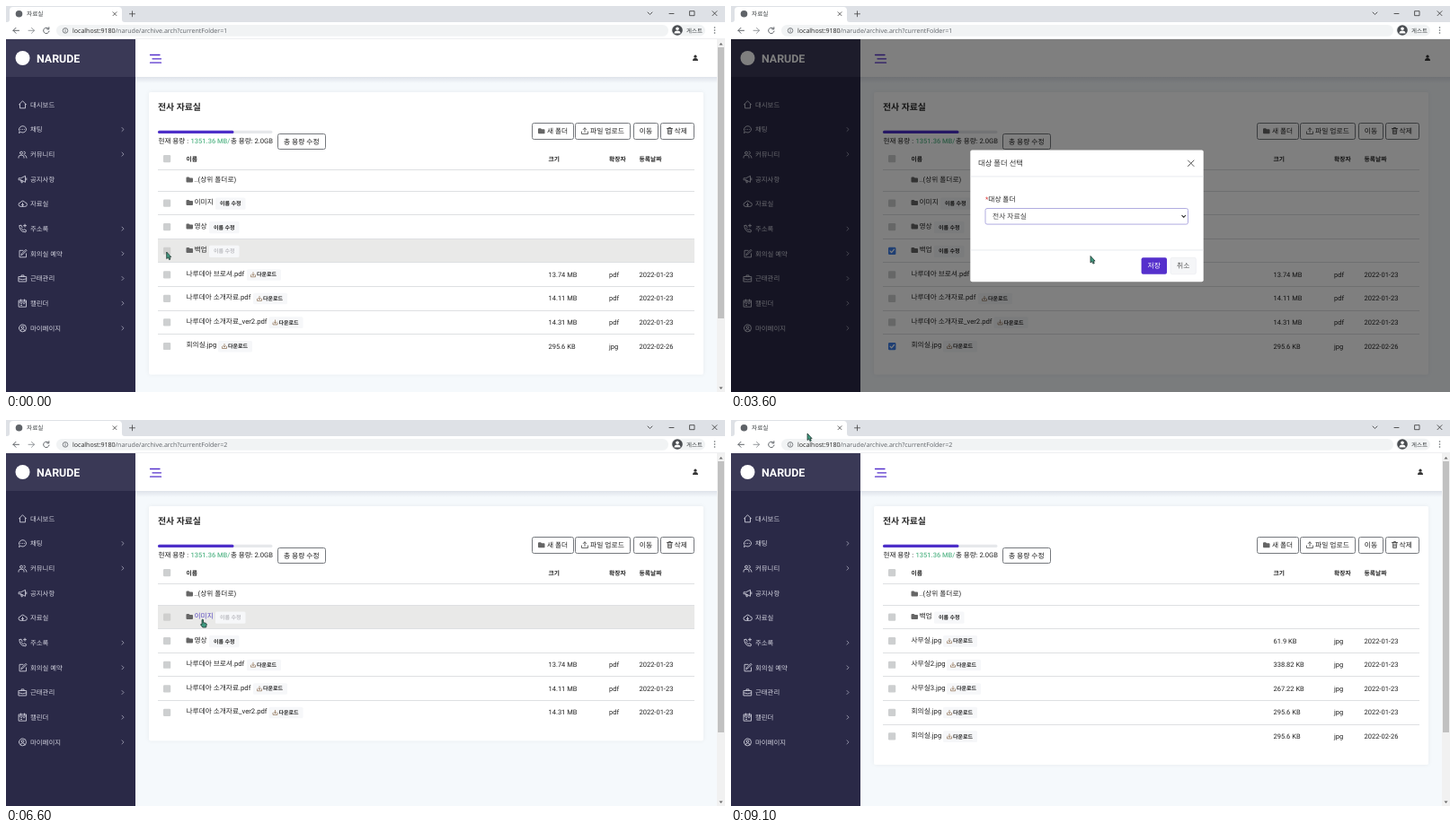
Animation of 800 by 430 pixels, one loop 9200 ms. Source, as an HTML page:

```html
<!DOCTYPE html>
<html lang="ko">
<head>
<meta charset="utf-8">
<title>자료실</title>
<style>
html, body { margin: 0; width: 100%; height: 100%; overflow: hidden; background: #f5f9fc; }
svg { display: block; width: 800px; height: 430px; }
text { font-family: Roboto, "Noto Sans CJK KR", "Noto Sans CJK", sans-serif; white-space: pre; text-rendering: geometricPrecision; }
.ui { font-family: "Open Sans", "Noto Sans CJK KR", "Noto Sans CJK", sans-serif; }
</style>
</head>
<body>
<svg id="stage" viewBox="0 0 800 430" xmlns="http://www.w3.org/2000/svg">
  <g id="page"></g>
  <g id="head"></g>
  <g id="table"></g>
  <g id="over"></g>
  <g id="browser"></g>
  <g id="cursor"></g>
</svg>
<script>
const LOOP = 9200, STEP = 100;
const INK = '#222', PURPLE = '#5530cc', SIDE = 144;
const $ = id => document.getElementById(id);

const rect = (x, y, w, h, fill, r = 0, extra = '') =>
  `<rect x="${x}" y="${y}" width="${w}" height="${h}" rx="${r}" fill="${fill}" ${extra}/>`;
const text = (x, y, s, size = 7.6, fill = INK, extra = '') =>
  `<text x="${x}" y="${y}" font-size="${size}" fill="${fill}" ${extra}>${s}</text>`;
const line = (d, color, w = 0.8) =>
  `<path d="${d}" fill="none" stroke="${color}" stroke-width="${w}" stroke-linecap="round" stroke-linejoin="round"/>`;
const shape = (d, fill, extra = '') => `<path d="${d}" fill="${fill}" ${extra}/>`;
const circle = (x, y, r, fill, extra = '') => `<circle cx="${x}" cy="${y}" r="${r}" fill="${fill}" ${extra}/>`;
const at = (x, y, s, extra = '') => `<g transform="translate(${x} ${y})" ${extra}>${s}</g>`;
const MID = 'text-anchor="middle"', BOLD = 'font-weight="700"';

const folder = (x, y) => shape(`M${x} ${y + 1}q0-1 1-1h2l1 1h2.6q.9 0 .9.9v3.2q0 .9-.9.9h-5.6q-1 0-1-1z`, '#666');
const download = (x, y, color) => line(`M${x} ${y + 3}v2h5v-2M${x + 2.5} ${y}v3.3m-1.3-1.2l1.3 1.3 1.3-1.3`, color, 0.7);
const person = (x, y) => circle(x, y - 1.8, 1.6, '#333') + shape(`M${x - 3} ${y + 3}q0-3 3-3t3 3z`, '#333');

// Sidebar icons on a 10 unit grid
const ICONS = [
  'M1 5L5 1l4 4M2 4.5V9h6V4.5',
  'M1 5a4 3.6 0 1 1 2 3L1 9l.6-2A3.5 3.5 0 0 1 1 5M3.2 5h.1M5 5h.1M6.8 5h.1',
  'M2 3.5a1.5 1.5 0 1 0 3 0a1.5 1.5 0 1 0-3 0M.5 9V8q0-2 3-2t3 2v1M6.5 2a1.5 1.5 0 0 1 0 3M7.5 6q2 .5 2 3',
  'M1 4h2l5-2.5v7L3 6H1zM3 6l.7 3h1L4.5 6.7M9.3 4v2',
  'M3 8a2.3 2.3 0 0 1-.3-4.6a2.7 2.7 0 0 1 5 0A2.2 2.2 0 0 1 7.5 8zM5 4v3M3.8 5.8L5 7l1.2-1.2',
  'M1.5 1.5l2-.5 1 2.4-1 1q.8 1.4 2.2 2.2l1-1L9 6.7l-.5 2Q4 9 2.5 6T1.5 1.5M6 1.5h3M7.5 0v3',
  'M5.5 1.5h-4v7.5h7.5V5M3.5 6.5L4 5l4.5-4.5 1 1L5 6z',
  'M.8 3h8.4v5.5H.8zM3.5 3V1.5h3V3M.8 5.5Q5 7.2 9.2 5.5',
  'M1 1.8h8V9H1zM1 3.8h8M3 .8v1.8M7 .8v1.8M3 5.5h1M6 5.5h1M3 7.3h1',
  'M1 5a4 4 0 1 0 8 0a4 4 0 1 0-8 0M3.7 4a1.3 1.3 0 1 0 2.6 0a1.3 1.3 0 1 0-2.6 0M2.5 8q.5-2 2.5-2t2.5 2'
];
const MENU = ['대시보드', '채팅', '커뮤니티', '공지사항', '자료실', '주소록', '회의실 예약', '근태관리', '캘린더', '마이페이지'];
const PLAIN = [0, 3, 4];

function drawSidebar() {
  const items = MENU.map((name, i) => {
    const y = 109.8 + i * 27.67;
    return at(13.5, y - 5, line(ICONS[i], '#d6d6e2', 0.85)) +
      text(27, y + 2.7, name, 7.4, '#d2d2de') +
      (PLAIN.includes(i) ? '' : line(`M129 ${y - 2}l2 2-2 2`, '#aaaabd', 0.8));
  }).join('');
  return rect(0, 37, SIDE, 393, '#2a2947') + rect(0, 37, SIDE, 42, '#3a3956') +
    circle(18.5, 58, 8, '#fff') +
    text(34, 62.5, 'NARUDE', 12.4, '#fff', BOLD) + items;
}

function drawBrowser(folderId) {
  const dark = '#5f6368';
  return rect(0, 0, 800, 18, '#dee1e6') + shape('M1 18q3 0 3-3V5q0-4 4-4h117q4 0 4 4v10q0 3 3 3z', '#fff') +
    rect(0, 18, 800, 19, '#fff') + rect(0, 36.5, 800, 0.5, '#dcdfe3') +
    circle(14.5, 8.7, 3.8, dark) + text(23, 11.2, '자료실', 6.7, '#3c4043', 'class="ui"') +
    line('M119 6.7l4 4m0-4l-4 4M140.5 5.8v6m-3-3h6', '#444', 0.8) +
    line('M714 7l2.5 2.5 2.5-2.5M738 8.5h5M761 5.7h5v5h-5zM786 5.7l5 5m0-5l-5 5', '#333', 0.8) +
    line('M14.5 27.3h-6.5m3-3l-3 3 3 3', dark, 1) + line('M25 27.3h6.5m-3-3l3 3-3 3', '#8b8f94', 0.9) +
    line('M47.3 25.3a3.2 3.2 0 1 0 .7 2.8M47.8 23.7v2.2h-2.2', dark, 1) +
    rect(56, 21, 681, 12.8, '#f1f3f4', 6.4) +
    circle(66, 27.4, 2.8, 'none', `stroke="${dark}" stroke-width=".8"`) + line('M66 27v1.7M66 25.9v.1', dark, 0.7) +
    text(74, 30, `localhost:9180<tspan fill="#5f6368">/narude/archive.arch?currentFolder=${folderId}</tspan>`, 7.05, INK, 'class="ui"') +
    rect(740, 20.8, 38, 12.8, '#f1f3f4', 6.4) + circle(747, 27, 5.8, '#4a4d51') +
    circle(747, 25.2, 1.8, '#fff') + shape('M743.5 30.5q0-3 3.5-3t3.5 3z', '#fff') +
    text(757, 29.6, '게스트', 6.5, '#3c4043', 'class="ui"') +
    [24, 27, 30].map(y => circle(788.5, y, 0.8, dark)).join('');
}

const button = (x, y, w, h = 18) => rect(x, y, w, h, '#fff', 2, 'stroke="#75787d" stroke-width="1"');

function drawHead(locked) {
  const edge = locked ? 800 : 791, dx = locked ? 8 : 0;
  return rect(SIDE, 37, edge - SIDE, 42, '#fff') +
    rect(SIDE, 79, edge - SIDE, 7, 'url(#fade)') +
    line('M160.5 54.5h10.5M163 58.8h9.5M160.5 63.2h12', PURPLE, 1.3) + person(767 + dx, 58) +
    (locked ? '' : rect(791, 37, 9, 393, '#f1f1f1') + rect(792, 46, 7, 302, '#c1c1c1') +
      shape('M793.5 43.5l2-2.5 2 2.5z', '#666') + shape('M793.5 424.5l2 2.5 2-2.5z', '#666'));
}

function checkbox(y, on, hovered) {
  return on
    ? rect(175, y - 4, 8.4, 8.4, '#3f7fe8', 1.4) + line(`M177 ${y + 0.3}l1.6 1.7 2.9-3.4`, '#fff', 1.2)
    : rect(175, y - 4, 8.2, 8.2, hovered ? '#cfcfce' : '#cdcfd0', 1.2);
}

// name, button x, size, extension, date
const dir = (name, bx) => ({ name, bx, dir: true });
const file = (name, bx, size, date = '2022-01-23') => ({ name, bx, size, date, ext: name.split('.')[1] });
const UP = { name: '..(상위 폴더로)', dir: true };
const IMAGES = dir('이미지', 233), VIDEOS = dir('영상', 226), BACKUP = dir('백업', 226);
const ROOM = file('회의실.jpg', 236, '295.6 KB', '2022-02-26');
const DOCS = [
  file('나루데아 브로셔.pdf', 268, '13.74 MB'),
  file('나루데아 소개자료.pdf', 275, '14.11 MB'),
  file('나루데아 소개자료_ver2.pdf', 292.5, '14.31 MB')
];
const BEFORE = [UP, IMAGES, VIDEOS, BACKUP, ...DOCS, ROOM];
const MOVED = [UP, IMAGES, VIDEOS, ...DOCS];
const INSIDE = [
  UP, BACKUP,
  file('사무실.jpg', 236, '61.9 KB'), file('사무실2.jpg', 240, '338.82 KB'), file('사무실3.jpg', 240, '267.22 KB'),
  file('회의실.jpg', 236, '295.6 KB'), ROOM
];
const rowTop = i => i ? 206.2 + (i - 1) * 26.57 : 182;
const rule = y => rect(169, Math.floor(y), 597, 1, '#dee0e2');

function drawRow(row, i, s) {
  const top = rowTop(i), h = rowTop(i + 1) - top, y = top + h / 2;
  const hovered = s.hover === i, near = hovered && s.x < 400;
  let out = hovered ? rect(169, Math.floor(top), 597, Math.ceil(h), '#e9e9e8') : '';
  out += rule(top);
  if (i) out += checkbox(y, s.checked.includes(row), hovered);
  const link = s.hand && hovered ? '#5a4bc0' : INK;
  if (row.dir) {
    out += folder(200.5, y - 3.6) + text(209.5, y + 1.5, row.name, 7.7, link);
    if (row.bx) out += rect(row.bx, y - 6, 33.5, 13.3, '#f6f7f9', 1.5) +
      text(row.bx + 16.8, y + 2.5, '이름 수정', 6, near ? '#bdbdc2' : INK, `${MID} ${BOLD}`);
  } else {
    out += text(200.5, y + 1.5, row.name, 7.7, link) +
      rect(row.bx, y - 6, 38, 12.6, '#f6f7f9', 1.5) + download(row.bx + 4.5, y - 2.4, '#8a6a4c') +
      text(row.bx + 11, y + 2.2, '다운로드', 6, INK, BOLD) +
      text(603.5, y + 2.6, row.size, 7.5) + text(671, y + 2.6, row.ext, 7.5) + text(704.5, y + 2.6, row.date, 7.5);
  }
  return out;
}

function drawTable(s) {
  const n = s.rows.length, dx = s.alert ? 1.5 : 0;
  const heads = [[200.5, '이름'], [603.5, '크기'], [671, '확장자'], [704.5, '등록날짜']];
  return rect(159, 96, 617, rowTop(n) + 18.3 - 96, '#fff', 2, 'filter="url(#soft)"') +
    text(169, 115.5, '전사 자료실', 9.9, '#2c2c2c', BOLD) +
    rect(169, 138.8, 127.5 + dx, 3.2, '#e6e8eb', 1.6) + rect(169, 138.8, 84.5 + dx, 3.2, '#4d2fc9', 1.6) +
    text(169.5, 152.7, '현재 용량 : ', 7.6) + text(205.5, 152.7, '1351.36 MB/', 7.5, '#5cb88c', 'font-weight="500"') +
    text(250, 152.7, '총 용량: 2.0GB', 7.6) +
    button(302.5 + dx, 142.5, 53, 17) + text(328.8 + dx, 153.5, '총 용량 수정', 7.8, INK, MID) +
    button(585.5, 130.5, 46) + folder(592, 136.3) + text(602, 142, '새 폴더', 7.7) +
    button(633.5, 130.5, 61) + line('M640.5 140v2.5h7v-2.5M644 140.5v-4.5m-1.8 1.6l1.8-1.8 1.8 1.8', '#444', 0.8) +
    text(650, 142, '파일 업로드', 7.8) +
    button(698.5, 130.5, 27) + text(712, 142, '이동', 7.8, INK, MID) +
    button(728.5, 130.5, 37) + line('M735.5 136.5h6M737.5 136.5v-1h2v1M736.2 136.5l.4 6h3.8l.4-6M737.8 138v3M739.2 138v3', '#333', 0.75) +
    text(743.5, 142, '삭제', 7.8) +
    checkbox(170, false) + heads.map(([x, w]) => text(x, 172.8, w, 6.75, INK, BOLD)).join('') +
    s.rows.map((r, i) => drawRow(r, i, s)).join('');
}

function drawModal(s) {
  const options = ['전사 자료실', '이미지', '영상', '백업'];
  const list = s.open ? rect(283, 243.5, 225.5, 46, '#fff', 0, 'stroke="#888" stroke-width=".6"') +
    options.map((o, i) => (i === s.pick ? rect(283.3, 244 + i * 11.3, 225, 11.3, '#1e78d8') : '') +
      text(291, 252.3 + i * 11.3, o, 7.7, i === s.pick ? '#fff' : INK)).join('') : '';
  return rect(266.3, 160.5, 259.4, 146.7, '#fff', 2) +
    text(275, 178, '대상 폴더 선택', 8.3, '#333') + line('M508.5 172l6.5 6.5m0-6.5l-6.5 6.5', '#555', 1) +
    rect(266.3, 189.6, 259.4, 0.7, '#dfe2e6') + rect(266.3, 271.6, 259.4, 0.7, '#dfe2e6') +
    text(283, 218, '<tspan fill="#d33">*</tspan>대상 폴더', 7.7) +
    rect(283, 225.5, 225.5, 17.6, '#fff', 2, 'stroke="#a9a3dd" stroke-width=".9"') +
    text(291, 237, options[s.value], 7.8, '#444') + line('M501.8 233.4l1.9 2 1.9-2', '#333', 1.1) +
    rect(456.6, 280.3, 28.4, 18.5, PURPLE, 2) + text(470.8, 292.2, '저장', 7.8, '#fff', MID) +
    rect(489, 280.3, 28.4, 18.5, '#f5f6f8', 2, 'stroke="#e8eaee" stroke-width=".6"') + text(503.2, 292.2, '취소', 7.8, '#555', MID) + list;
}

function drawOver(s) {
  const shade = Math.max(s.modal * 0.5, s.alert * 0.4);
  return (shade ? rect(0, 37, 800, 393, '#000', 0, `opacity="${shade}"`) : '') +
    (s.modal ? at(0, (s.modal - 1) * 25, drawModal(s), `opacity="${s.modal}"`) : '') +
    (s.alert ? at(0, (s.alert - 1) * 20, rect(267, 41.5, 266, 35.3, '#2a2b2d', 2.5) +
      text(400, 60.8, '저장되었습니다.', 10.1, '#fff', MID), `opacity="${s.alert}"`) : '');
}

function drawCursor(s) {
  const art = s.hand
    ? 'M0 .6q.9-1 1.5 0v3l3 .8q1 .4.7 1.6l-.6 3h-3.8l-2.3-3q0-1 1.5-.4z'
    : 'M0 0v7.5l1.7-1.4 1.2 2.5 1.4-.6-1.2-2.4h2z';
  return at(s.x, s.y, shape(art, '#3f9a80', 'stroke="#20352f" stroke-width=".8" stroke-linejoin="round"'));
}

const PATH = [
  [0, 178.7, 274], [300, 178.7, 274], [800, 178.7, 374], [1100, 179, 374], [1700, 632, 204.5], [2000, 709, 137],
  [2400, 709, 138], [3000, 470, 262], [3600, 400, 278.5], [3800, 396, 234], [4000, 396, 236], [4300, 392, 258],
  [4400, 392, 258], [4700, 469, 288], [4900, 469, 288], [5700, 235.5, 218.5], [6100, 218, 222], [6800, 218, 222],
  [7100, 222.5, 222.5], [8500, 222.5, 222.5], [9000, 106, 42], [9100, 85, 15]
];
const smooth = k => k * k * (3 - 2 * k);
const ramp = (t, a, b) => smooth(Math.min(1, Math.max(0, (t - a) / (b - a))));
const within = (t, a, b) => t >= a && t < b;

function pointer(t) {
  const i = PATH.findIndex(p => p[0] > t);
  if (i < 0) return PATH[PATH.length - 1].slice(1);
  const [a, ax, ay] = PATH[i - 1], [b, bx, by] = PATH[i];
  const k = ramp(t, a, b);
  return [ax + (bx - ax) * k, ay + (by - ay) * k];
}

function stateAt(t) {
  const [x, y] = pointer(t);
  const s = { x, y, checked: [] };
  s.rows = t < 5000 ? BEFORE : t < 6700 ? MOVED : INSIDE;
  if (within(t, 100, 5000)) s.checked.push(BACKUP);
  if (within(t, 900, 5000)) s.checked.push(ROOM);
  s.modal = ramp(t, 2200, 2600) * (1 - ramp(t, 4700, 5000));
  // The notice stays solid until the page unlocks
  s.alert = t < 5900 ? ramp(t, 4900, 5200) : 0;
  s.open = within(t, 3900, 4400);
  s.pick = t < 4200 ? 0 : 1;
  s.value = t < 4400 ? 0 : 1;
  s.hand = within(t, 6000, 6700);
  s.locked = s.modal > 0 || s.alert > 0;
  s.hover = s.locked || x < 169 || x > 766 ? -1
    : s.rows.findIndex((r, i) => y + 3 >= rowTop(i) && y + 3 < rowTop(i + 1));
  s.folder = t < 6500 ? 1 : 2;
  return s;
}

function put(id, markup) {
  const node = $(id);
  if (node.last !== markup) node.innerHTML = node.last = markup;
}

function render(t) {
  const s = stateAt(t);
  put('head', drawHead(s.locked));
  put('table', drawTable(s));
  put('over', drawOver(s));
  put('browser', drawBrowser(s.folder));
  put('cursor', drawCursor(s));
}

$('page').innerHTML =
  `<defs><linearGradient id="fade" x2="0" y2="1"><stop stop-color="#dfe3ea"/><stop offset="1" stop-color="#f5f9fc"/></linearGradient>
  <filter id="soft" x="-5%" y="-5%" width="110%" height="110%"><feDropShadow dx="0" dy="0" stdDeviation="2" flood-color="#445" flood-opacity=".06"/></filter></defs>` +
  rect(0, 37, 800, 393, '#f5f9fc') + drawSidebar();

const start = performance.now();
function tick() {
  const t = (performance.now() - start) % LOOP;
  render(Math.floor(t / STEP) * STEP);
  requestAnimationFrame(tick);
}
tick();
</script>
</body>
</html>
```
